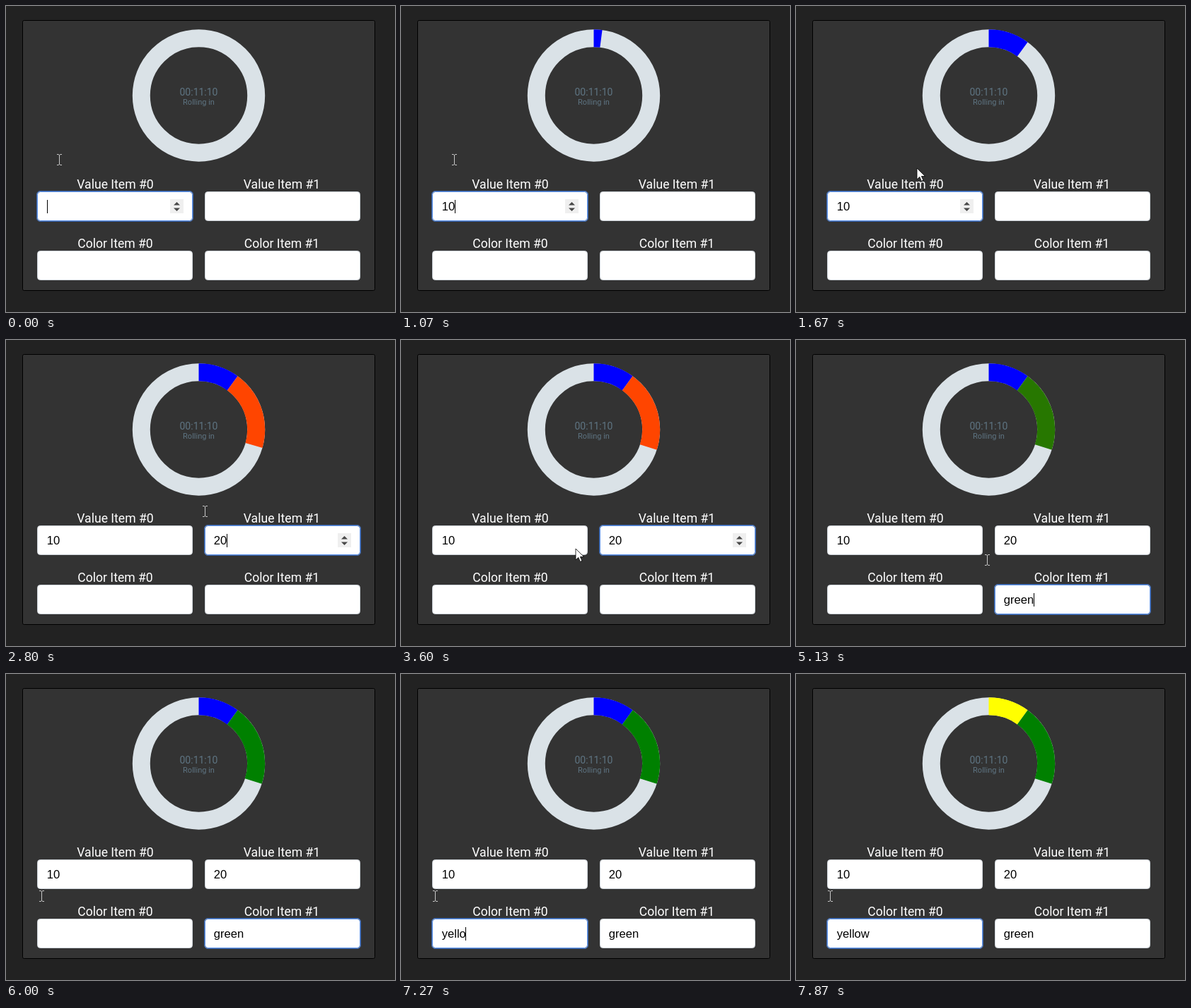
An HTML page that plays this animation: 550x434 px, repeating every 8000 ms.

```html
<!DOCTYPE html>
<html lang="en">
<head>
<meta charset="utf-8">
<title>Donut form</title>
<style>
  html, body { margin: 0; width: 100%; height: 100%; overflow: hidden; background: #222; }
  svg { display: block; width: 550px; height: 434px; }
  text { white-space: pre; }
  .label, .time, .note { font-family: Roboto, sans-serif; text-anchor: middle; }
  .label { font-size: 17.6px; fill: #fff; }
  .time { font-size: 14px; fill: #5e7482; }
  .note { font-size: 11px; fill: #5e7482; }
  .value { font: 16.6px "Liberation Sans", Arial, sans-serif; fill: #000; }
  .ring circle { fill: none; stroke-width: 25; }
</style>
</head>
<body>
<svg viewBox="0 0 550 434">
  <rect width="550" height="434" fill="#222"/>
  <rect x="23.5" y="20.5" width="498" height="383" rx="2" fill="#333" stroke="#000"/>
  <g class="ring" transform="translate(272.5 127) rotate(-90)">
    <circle r="81.2" stroke="#dae2e7"/>
    <circle id="arc0" r="81.2" pathLength="100"/>
    <circle id="arc1" r="81.2" pathLength="100"/>
  </g>
  <text class="time" x="272.5" y="127">00:11:10</text>
  <text class="note" x="272.5" y="140">Rolling in</text>
  <g id="fields"></g>
  <path id="beam" fill="none" stroke="#c8c8c8" d="M-3.5-7.5H-1.5L0-6.5 1.5-7.5H3.5M0-6.5V6.5M-3.5 7.5H-1.5L0 6.5 1.5 7.5H3.5"/>
  <path id="arrow" fill="#fff" stroke="#000" stroke-width=".8" d="M0 0V16L3.8 12.4 6.4 18.4 9 17.3 6.4 11.5H11.6Z"/>
</svg>
<script>
const LOOP = 8000, TICK = 1000 / 15, BLINK = 530;
const FADE = 300, LEAD = 35;

// Typed keys per field: [time, character]
const fields = [
  { name: 'Value Item #0', x: 44, y: 263, spin: true, keys: [[870, '1'], [1070, '0']] },
  { name: 'Value Item #1', x: 281, y: 263, spin: true, keys: [[2530, '2'], [2600, '0']] },
  { name: 'Color Item #0', x: 44, y: 347,
    keys: [[6600, 'y'], [6800, 'e'], [6930, 'l'], [7070, 'l'], [7270, 'o'], [7330, 'w']] },
  { name: 'Color Item #1', x: 281, y: 347,
    keys: [[4330, 'g'], [4530, 'r'], [4670, 'e'], [4870, 'e'], [5000, 'n']] }
];
// Clicks: [time, field index]
const clicks = [[0, 0], [2070, 1], [3800, 3], [6070, 2]];
// Pointer path: [time, x, y]
const path = [
  [0, 75, 218], [1470, 75, 218], [1670, 171, 230], [1930, 285, 243], [2530, 285, 243],
  [2670, 281, 243], [3130, 281, 243], [3330, 252, 262], [3530, 239, 290], [3800, 270, 312],
  [5600, 270, 312], [5800, 172, 308], [6000, 50, 315], [6070, 48, 315]
];
const arrowSpans = [[1600, 1800], [3330, 3600], [5730, 5870]];

const $ = id => document.getElementById(id);
const clamp = v => Math.min(1, Math.max(0, v));
const mix = (a, b, p) => a + (b - a) * p;

// CSS "ease": cubic-bezier(.25, .1, .25, 1)
function ease(p) {
  if (p <= 0 || p >= 1) return clamp(p);
  let lo = 0, hi = 1, s;
  for (let i = 0; i < 20; i++) {
    s = (lo + hi) / 2;
    const x = .75 * s * (1 - s) + s ** 3;
    if (x < p) lo = s; else hi = s;
  }
  return .3 * s * (1 - s) ** 2 + 3 * s * s * (1 - s) + s ** 3;
}
const fade = (t, start) => ease(clamp((t - start + LEAD) / FADE));

function add(parent, tag, attrs, text) {
  const el = document.createElementNS('http://www.w3.org/2000/svg', tag);
  for (const key in attrs) el.setAttribute(key, attrs[key]);
  if (text) el.textContent = text;
  return parent.appendChild(el);
}

for (const f of fields) {
  const { x, y } = f, root = $('fields');
  add(root, 'text', { class: 'label', x: x + (x < 100 ? 110.5 : 109), y: y - 4 }, f.name);
  add(root, 'rect', { x: x + .5, y: y + .5, width: 219, height: 41, rx: 4, fill: '#fff', stroke: '#ced4da' });
  f.focus = add(root, 'g', { fill: 'none' });
  add(f.focus, 'rect', { x: x - .5, y: y - .5, width: 221, height: 43, rx: 4.5, stroke: '#3d65a8' });
  add(f.focus, 'rect', { x: x + .5, y: y + .5, width: 219, height: 41, rx: 4, stroke: '#5f92e4' });
  if (f.spin) {
    f.spinner = add(root, 'g', { transform: `translate(${x + 188} ${y + 11})` });
    add(f.spinner, 'rect', { width: 19, height: 20, fill: '#efefef' });
    add(f.spinner, 'path', { d: 'M5 8.5L9.5 4 14 8.5ZM5 12.5L9.5 17 14 12.5Z', fill: '#484848' });
  }
  f.left = x + (x < 100 ? 13.7 : 12.7);
  f.text = add(root, 'text', { class: 'value', x: f.left, y: y + 27 });
  f.caret = add(root, 'rect', { y: y + 12, width: 1, height: 19 });
}

const advance = { y: .5, l: .222, r: .333, w: .722 };
const textWidth = s => [...s].reduce((sum, c) => sum + (advance[c] || .556) * 16.6, 0);

function drawField(f, i, t) {
  const typed = f.keys.filter(k => k[0] <= t);
  const text = typed.map(k => k[1]).join('');
  const n = clicks.findLastIndex(c => c[0] <= t);
  const active = clicks[n][1] === i;
  const since = typed.length ? Math.max(typed.at(-1)[0], clicks[n][0]) : clicks[n][0];
  const caretX = text ? Math.floor(f.left + textWidth(text)) : Math.ceil(f.left);
  const p = n ? clamp((t - clicks[n][0] + 30) / 90) : 1;
  const wasActive = n && clicks[n - 1][1] === i;

  f.text.textContent = text;
  f.focus.setAttribute('opacity', active ? p : wasActive ? 1 - p : 0);
  if (f.spinner) f.spinner.setAttribute('opacity', active ? 1 : 0);
  f.caret.setAttribute('x', caretX);
  f.caret.setAttribute('opacity', active && Math.floor((t - since) / BLINK) % 2 === 0 ? 1 : 0);
}

// Each key press eases the share towards the number typed so far.
function share(f, t) {
  let value = 0, target = '';
  for (const [at, char] of f.keys) {
    if (t < at) break;
    target += char;
    value = mix(value, +target, fade(t, at));
  }
  return value;
}

function drawArc(el, start, size, from, to, p) {
  el.setAttribute('stroke', `rgb(${from.map((c, i) => Math.round(mix(c, to[i], p)))})`);
  el.setAttribute('stroke-dasharray', `${size} 200`);
  el.setAttribute('stroke-dashoffset', -start);
  el.setAttribute('visibility', size > 0 ? 'visible' : 'hidden');
}

function drawPointer(t) {
  const i = path.findLastIndex(k => k[0] <= t);
  const a = path[i], b = path[i + 1] || a;
  const p = b === a ? 0 : (t - a[0]) / (b[0] - a[0]);
  const x = Math.round(mix(a[1], b[1], p)), y = Math.round(mix(a[2], b[2], p));
  const isArrow = arrowSpans.some(s => t >= s[0] && t <= s[1]);
  $('beam').setAttribute('visibility', isArrow ? 'hidden' : 'visible');
  $('arrow').setAttribute('visibility', isArrow ? 'visible' : 'hidden');
  $('beam').setAttribute('transform', `translate(${x + .5} ${y})`);
  $('arrow').setAttribute('transform', `translate(${x} ${y})`);
}

function draw(ms) {
  const t = Math.round(Math.floor((ms + 4) / TICK) * TICK / 10) * 10 % LOOP;
  fields.forEach((f, i) => drawField(f, i, t));
  const first = share(fields[0], t), second = share(fields[1], t);
  drawArc($('arc0'), 0, first, [0, 0, 255], [255, 255, 0], t < 7330 ? 0 : fade(t, 7330));
  drawArc($('arc1'), first, second, [255, 69, 0], [0, 128, 0], t < 5000 ? 0 : fade(t, 5000));
  drawPointer(t);
}

const begin = performance.now();
function loop() {
  draw((performance.now() - begin) % LOOP);
  requestAnimationFrame(loop);
}
loop();
</script>
</body>
</html>
```
